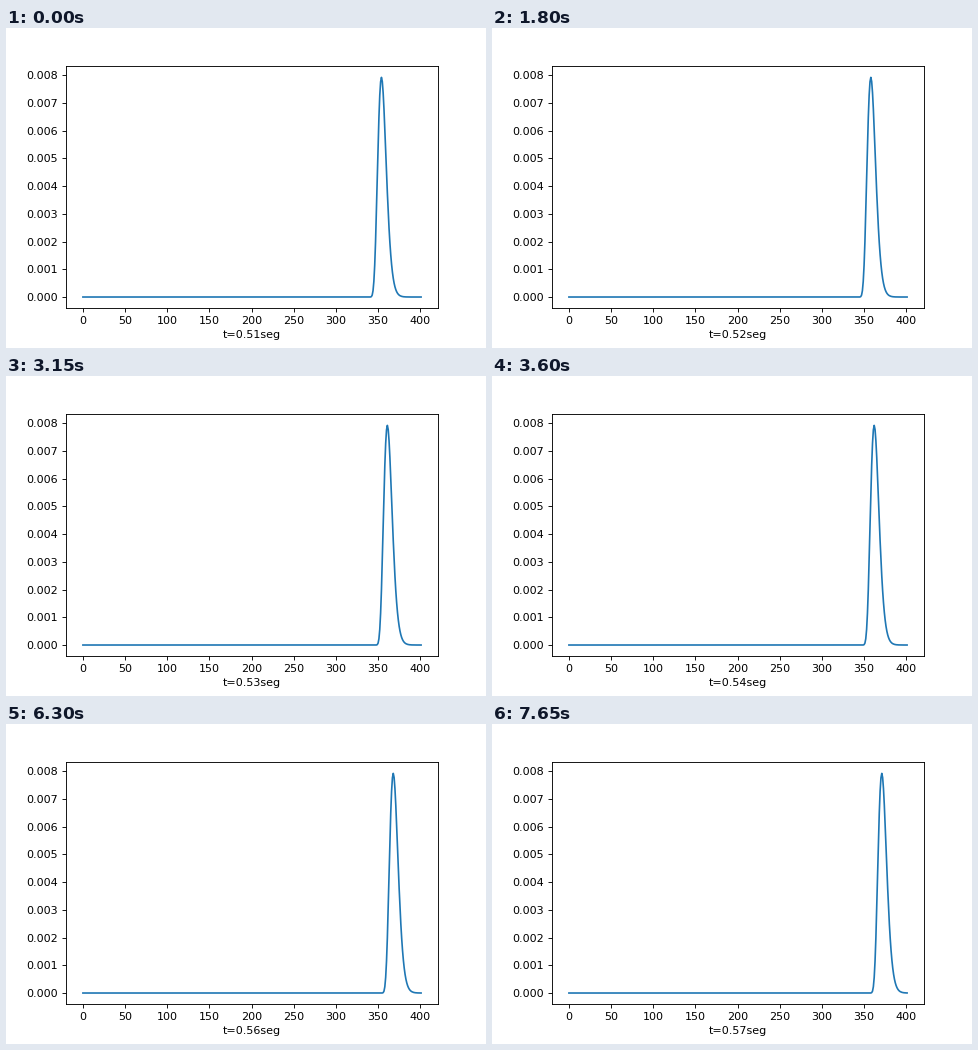
Animation, 480 px wide and 320 px high, one loop 8000 ms. Source, as a matplotlib script:

```python
import numpy as np
import matplotlib.pyplot as plt
from matplotlib.animation import FuncAnimation

TICK_MS = 50
LOOP_MS = 8000
STEP_MS = 450
FIRST_STEP = 153
STEPS_PER_SEC = 300
HEIGHT = 0.00792
SHAPE = 10      # skew of the pulse: lower means a longer right tail
RISE = 16.0     # distance from the foot to the crest

x = np.arange(402)


def pulse(crest):
    """Skewed travelling pulse with a steep left flank."""
    u = np.clip((x - crest) / RISE + 1, 0, None)
    return HEIGHT * (u * np.exp(1 - u)) ** SHAPE


fig, ax = plt.subplots(figsize=(6, 4), dpi=80)
fig.subplots_adjust(left=0.125, right=0.9, bottom=0.125, top=0.88)
line, = ax.plot(x, pulse(354))
label = ax.set_xlabel("")
ax.set_xlim(-0.05 * x[-1], 1.05 * x[-1])
ax.set_ylim(-0.05 * HEIGHT, 1.05 * HEIGHT)


def update(frame):
    step = frame * TICK_MS // STEP_MS
    line.set_ydata(pulse(354 + step))
    label.set_text(f"t={(FIRST_STEP + step) / STEPS_PER_SEC:.2f}seg")
    return line, label


anim = FuncAnimation(fig, update, frames=LOOP_MS // TICK_MS,
                     interval=TICK_MS, repeat=True, repeat_delay=0)
plt.show()
```
